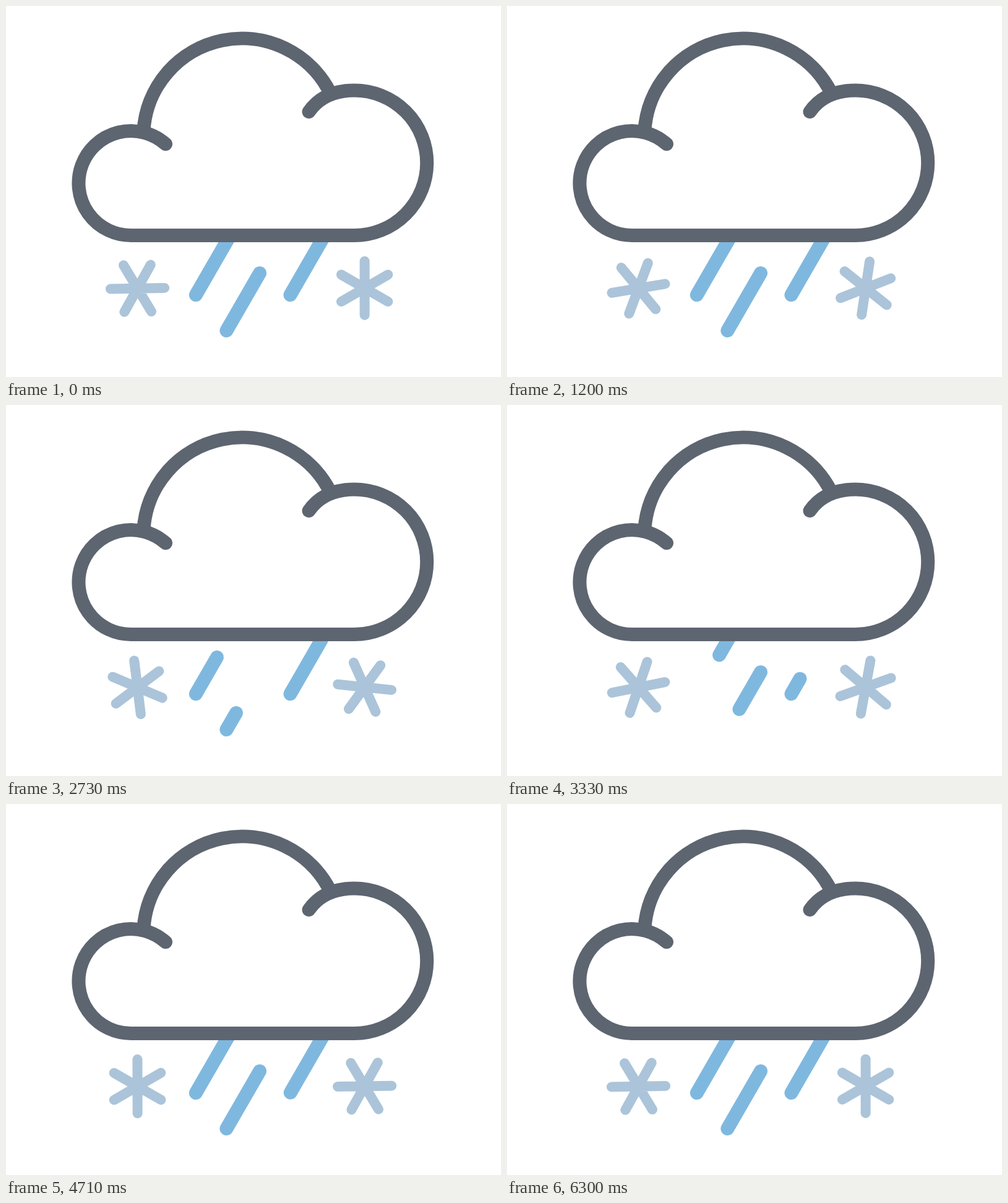
Write an HTML page that moves like this. It is 800 by 600 pixels and loops after 6.33 s.

```html
<!DOCTYPE html>
<html lang="en">
<head>
<meta charset="utf-8">
<title>Sleet</title>
<style>
  html, body { margin: 0; width: 100%; height: 100%; overflow: hidden; background: #fff; }
  svg { display: block; width: 800px; height: 600px; }
  path { fill: none; stroke-linecap: round; }
  .rain { stroke: #7fb8df; stroke-width: 22; }
  .snow { stroke: #abc4d9; stroke-width: 16; }
  .cloud { stroke: #5d6570; stroke-width: 22; }
</style>
</head>
<body>
<svg viewBox="0 0 800 600">
  <clipPath id="below"><rect y="371" width="800" height="229"/></clipPath>
  <g id="rain" clip-path="url(#below)"></g>
  <g id="snow"></g>
  <g class="cloud">
    <path d="M222.3 203A159.4 159.4 0 0 1 524 140.5" style="stroke-linecap:butt"/>
    <path d="M258 223.3A84.5 84.5 0 1 0 203 371H563A117.25 117.25 0 0 0 563 136.5C529.5 136.5 505.5 148 489.5 171"/>
  </g>
</svg>
<script>
  const LOOP = 6330, STEP = 30, TURN = 6300, RAIN_TIME = 3000;
  const SLOPE = -0.577; // sideways drift per pixel of fall

  const addPath = (parent, name, d = '') => {
    const path = document.createElementNS('http://www.w3.org/2000/svg', 'path');
    path.setAttribute('class', name);
    path.setAttribute('d', d);
    return document.getElementById(parent).appendChild(path);
  };

  const drops = [
    { x: 410, top: 432, bottom: 525, start: 1392 },
    { x: 365.2, top: 366, bottom: 467.2, start: 1610 },
    { x: 517.8, top: 366, bottom: 467.2, start: 1962 }
  ].map(drop => ({ ...drop, path: addPath('rain', 'rain') }));

  const arm = 43.6;
  const spokes = [0, 60, 120].map(deg => {
    const a = deg * Math.PI / 180;
    const x = arm * Math.sin(a), y = arm * Math.cos(a);
    return `M${-x} ${y}L${x} ${-y}`;
  }).join('');

  const flakes = [
    { x: 212.5, y: 456.7, angle: 29, spin: -1 },
    { x: 579.6, y: 456.3, angle: 0, spin: 1 }
  ].map(flake => ({ ...flake, path: addPath('snow', 'snow', spokes) }));

  const easeInOut = x => x < 0.5 ? 4 * x ** 3 : 1 - 4 * (1 - x) ** 3;
  const clamp = x => Math.min(1, Math.max(0, x));

  // First half wipes the drop away from its top, second half draws it again.
  function drawDrop({ x, top, bottom, start, path }, t) {
    const p = 2 * easeInOut(clamp((t - start) / RAIN_TIME));
    const from = p < 1 ? p : 0;
    const to = p < 1 ? 1 : p - 1;
    const point = k => {
      const fall = (bottom - top) * k;
      return `${x + SLOPE * fall} ${top + fall}`;
    };
    path.setAttribute('d', to - from > 0.001 ? `M${point(from)}L${point(to)}` : '');
  }

  function render(t) {
    drops.forEach(drop => drawDrop(drop, t));
    flakes.forEach(({ x, y, angle, spin, path }) =>
      path.setAttribute('transform', `translate(${x} ${y}) rotate(${angle + spin * 360 * t / TURN})`));
  }

  const begin = performance.now();
  function tick() {
    const t = (performance.now() - begin) % LOOP;
    render(Math.floor(t / STEP) * STEP);
    requestAnimationFrame(tick);
  }
  tick();
</script>
</body>
</html>
```
